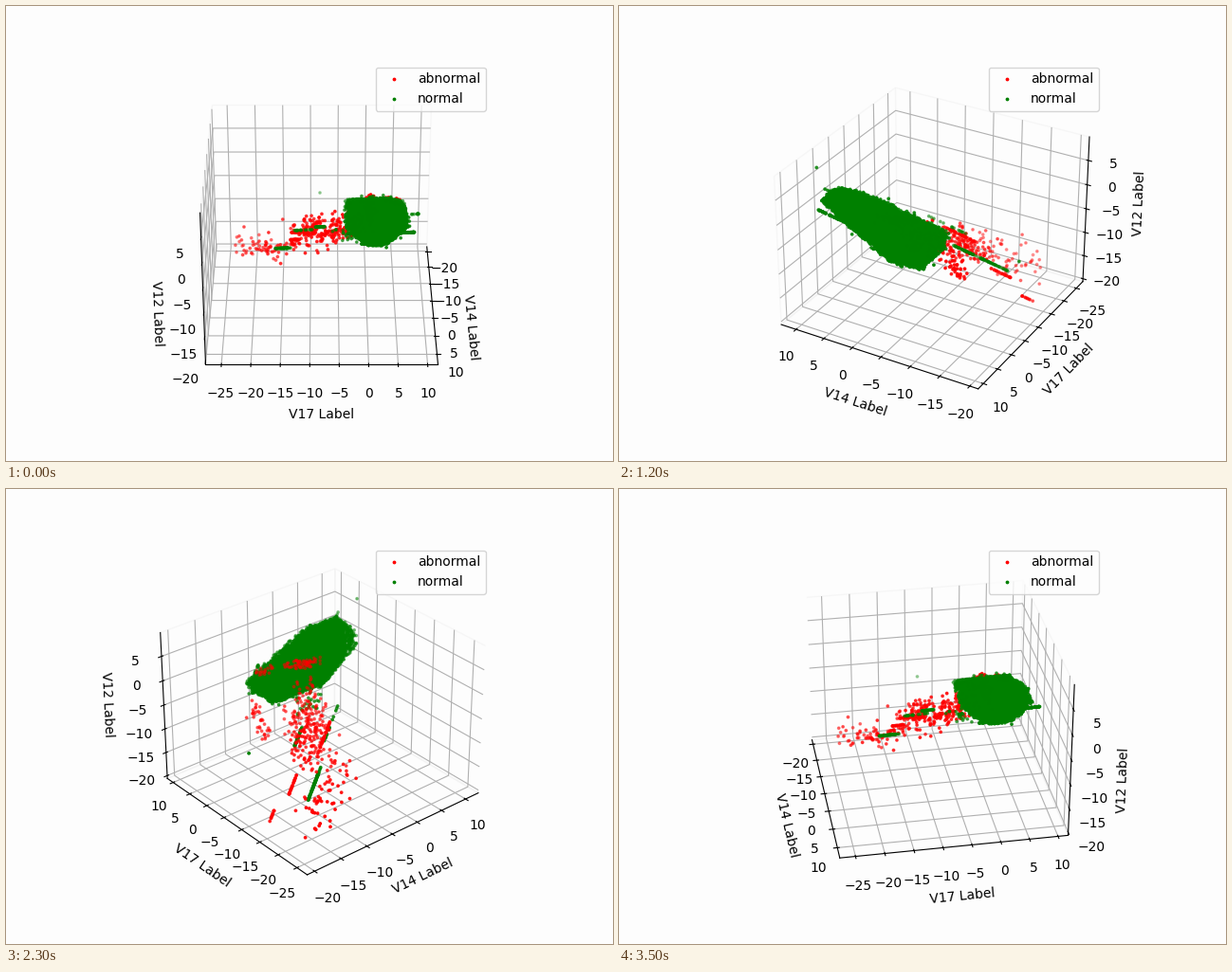
A matplotlib script for the animation above (3600 ms loop, 640 by 480 pixels).

```python
import matplotlib.pyplot as plt
import numpy as np
from matplotlib.animation import FuncAnimation
from matplotlib.ticker import MultipleLocator

FRAMES, INTERVAL = 36, 100
BACK = "#fdfdfd"
# Points are (V14, V17, V12); every streak runs along one direction.
STREAK = np.array([4.7, 3.0, 3.4])

rng = np.random.default_rng(17)


def spray(n, center, length=0.0, noise=0.0):
    """Points scattered along the streak direction."""
    t = rng.uniform(-0.5, 0.5, (n, 1)) * length
    return np.array(center) + t * STREAK + rng.normal(0, noise, (n, 3))


def lerp(a, b, t):
    return np.array(a) + np.multiply.outer(t, np.subtract(b, a))


def trail(n, a, b, length, noise):
    """A spray whose center drifts from a to b."""
    return spray(n, lerp(a, b, rng.random(n)), length, noise)


def body(n):
    """Leaning solid: an ellipse cut by slanted planes, tapering below."""
    a, b, c = rng.uniform(-1, 1, (3, n))
    v14 = 9 * a - 0.5
    v17 = 5.2 * b + 1.2
    v12 = 0.33 * v14 + 4.8 * c
    drop = 5.2 * v12 - 3.6 * v14
    rise = 5 * v12 + 3 * v17
    lean = 5.1 * v12 - 6 * v17
    keep = (
        (np.abs(a)**1.7 + c**2 < 1)
        & (np.abs(b) < np.interp(drop, [-33, -9], [0.1, 1]))
        & (drop < 22)
        & (rise > -24) & (rise < np.minimum(31 + 2.8 * v14, 36))
        & (lean > -58) & (lean < 14)
    )
    return np.column_stack([v14, v17, v12])[keep]


def flat_patch(n):
    """Thin sheet lying over the middle of the body."""
    v14 = rng.normal(-1.6, 1.6, n)
    v17 = rng.normal(0.4, 0.4, n)
    v12 = -0.2 - 0.25 * v14 + rng.normal(0, 0.4, n)
    return np.column_stack([v14, v17, v12])


abnormal = np.vstack(
    [
        flat_patch(65),
        trail(220, (-5, -3, -5), (-9, -12.5, -9), 1.3, 1.3),
        trail(65, (-11, -15, -14), (-11, -22, -12.5), 2.0, 1.0),
        trail(35, (-11.5, 1, -4), (-11.5, -3, -10), 0.2, 0.5),
        trail(20, (-7.5, 5.6, -1.4), (-6, 3, 0.2), 0, 0.3),
    ]
    + [spray(int(40 - 30 * t), lerp((-6.9, -12, -7.4), (-18.1, -13.5, -17.8), t),
             0.95 - 0.55 * t)
       for t in (0, 0.6, 1)]
)

solid = body(16000)
tufts = rng.choice(solid, 60)
normal = np.vstack(
    [solid, solid[::25] + rng.normal(0, 0.6, solid[::25].shape)]
    + [spray(14, p, rng.uniform(0.2, 0.6)) for p in tufts]
    + [
        spray(70, (-10.9, -15, -13.6), 1.0),
        spray(35, (-9.1, -8.2, -7.8), 0.6),
        spray(16, (-4.9, -11.2, -5.6), 1.1),
        spray(50, (5.6, 6.1, 1.1), 0.9),
        spray(10, (-5.8, 8.4, -2.9), 0.4),
        spray(25, (-3.5, -4, -5.5), 0, 1.2),
        spray(12, (-7.5, 5.8, -1.4), 0, 0.4),
        [(10.53, 2.7, 7.85), (-18.6, -8.3, -6.9)],
    ]
)

fig = plt.figure(figsize=(6.4, 4.8), dpi=100, facecolor=BACK)
ax = fig.add_subplot(projection="3d", facecolor=BACK)
for points, color, name in ((abnormal, "red", "abnormal"),
                            (normal, "green", "normal")):
    ax.scatter(*points.T, s=3, c=color, label=name)

ax.set(xlabel="V14 Label", ylabel="V17 Label", zlabel="V12 Label",
       xlim=(-21.38, 12.69), ylim=(-27.67, 11.76), zlim=(-20.62, 9.78))
for axis in (ax.xaxis, ax.yaxis, ax.zaxis):
    axis.set_major_locator(MultipleLocator(5))
    axis.pane.fill = False
    axis.pane.set_edgecolor("#f0f0f0")
ax.legend(loc="upper right", facecolor=BACK)


def update(i):
    turn = 2 * np.pi * i / FRAMES
    # A tiny nudge settles which side pane shows in edge-on views.
    nudge = 1e-6 * (np.cos(turn) - np.sin(turn))
    ax.view_init(elev=30, azim=np.degrees(turn) + nudge)


anim = FuncAnimation(fig, update, frames=FRAMES, interval=INTERVAL,
                     repeat=True, repeat_delay=0)
plt.show()
```
